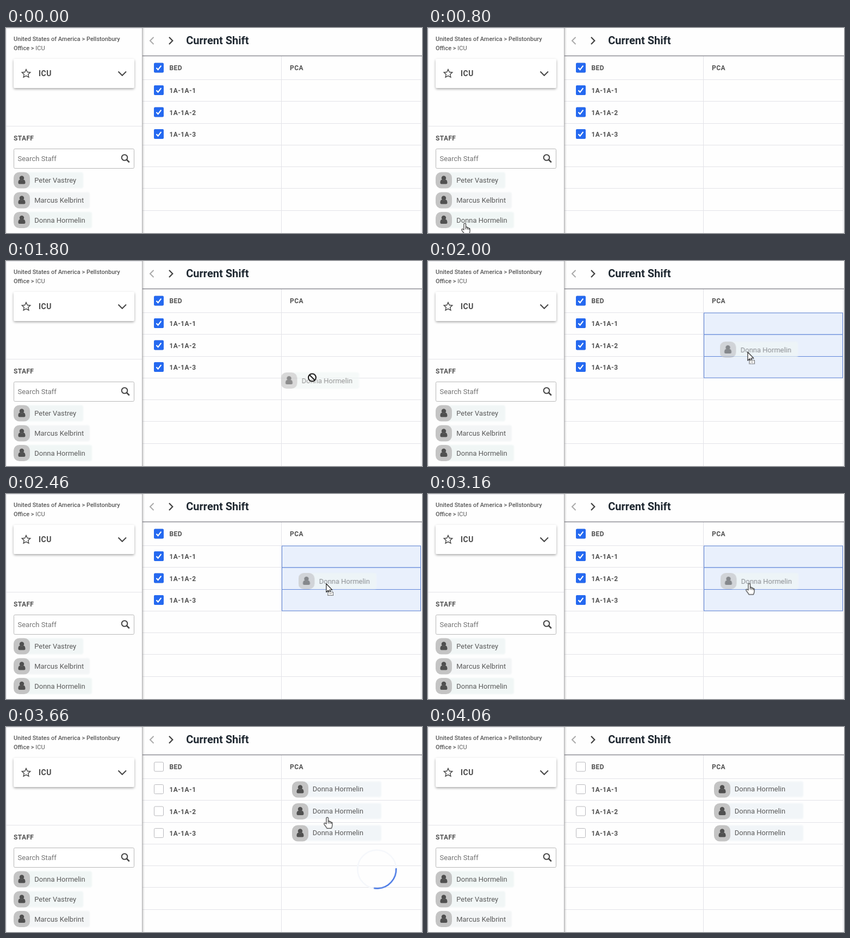
Recreate the animation shown at these times as an HTML page. Size 765 px wide and 379 px high, loop 4.5 s.

```html
<!DOCTYPE html>
<html lang="en">
<head>
<meta charset="utf-8">
<title>Shift assignment</title>
<style>
  html, body { margin: 0; width: 100%; height: 100%; overflow: hidden; background: #fefefe; }
  svg { display: block; width: 765px; height: 379px; font: 13px Roboto, sans-serif; fill: #5a5a5a; }
  .line { fill: none; stroke: #e3e3e8; }
  .head { font-size: 12px; font-weight: 700; letter-spacing: .4px; fill: #525252; }
  .crumb { font-size: 11px; font-weight: 500; }
  .icon { fill: none; stroke: #444; stroke-width: 2; }
  .cursor { fill: #fff; stroke: #111; stroke-width: 1.1; stroke-linejoin: round; }

  /* Every part shares one 4.5 s clock and changes in hard steps. */
  .timed { animation: 4.5s step-end infinite; }
  #hand { animation-name: hand; }
  #denied { animation-name: denied; }
  #arrow { animation-name: arrow; }
  #ghost { animation-name: ghost; }
  #targets { animation-name: targets; }
  #checked { animation-name: checked; }
  #assigned { animation-name: assigned; }
  #assignedIcons { animation-name: assigned-icons; }
  #before { animation-name: before; }
  #after { animation-name: after; }
  #spinner { animation-name: spinner; }
  #arc { animation-name: spin; transform-origin: 682px 263px; }

  @keyframes hand {
    0% { opacity: 0; transform: translate(61px, 359px); }
    6.66% { opacity: 1; transform: translate(61px, 359px); }
    8.88% { opacity: 1; transform: translate(67px, 361px); }
    17.77% { opacity: 1; transform: translate(68px, 361px); }
    22.22% { opacity: 1; transform: translate(67px, 359px); }
    26.66% { opacity: 0; transform: translate(67px, 359px); }
    70.22% { opacity: 1; transform: translate(591px, 165.5px); }
    72.44% { opacity: 1; transform: translate(591px, 167px); }
    85.77% { opacity: 1; transform: translate(670px, 250px); }
    88% { opacity: 1; transform: translate(752px, 334px); }
    90.22% { opacity: 0; transform: translate(752px, 334px); }
  }
  @keyframes denied {
    0% { opacity: 0; transform: none; }
    26.66% { opacity: 1; transform: translate(98px, 361px); }
    28.88% { opacity: 1; transform: translate(125px, 361px); }
    31.11% { opacity: 1; transform: translate(165px, 361px); }
    33.33% { opacity: 1; transform: translate(270px, 330px); }
    35.55% { opacity: 1; transform: translate(415px, 281px); }
    37.77% { opacity: 1; transform: translate(526px, 239px); }
    40% { opacity: 1; transform: translate(563px, 215.5px); }
    44.44% { opacity: 0; transform: none; }
  }
  @keyframes ghost {
    0% { opacity: 0; transform: none; }
    26.66% { opacity: .65; transform: translate(52px, 340px); }
    28.88% { opacity: .65; transform: translate(69px, 341px); }
    31.11% { opacity: .65; transform: translate(92px, 341.5px); }
    33.33% { opacity: .65; transform: translate(200px, 322px); }
    35.55% { opacity: .65; transform: translate(350px, 278px); }
    37.77% { opacity: .65; transform: translate(469px, 232px); }
    40% { opacity: .65; transform: translate(505.5px, 206px); }
    44.44% { opacity: .65; transform: translate(536.5px, 149px); }
    52.44% { opacity: .65; transform: translate(537px, 147px); }
    54.66% { opacity: .65; transform: translate(537.5px, 146px); }
    72.44% { opacity: 0; transform: none; }
  }
  @keyframes arrow {
    0% { opacity: 0; transform: none; }
    44.44% { opacity: 1; transform: translate(588px, 168.5px); }
    52.44% { opacity: 1; transform: translate(588.5px, 167px); }
    54.66% { opacity: 1; transform: translate(589px, 166px); }
    70.22% { opacity: 0; transform: none; }
  }
  @keyframes targets { 0% { opacity: 0 } 44.44% { opacity: 1 } 74.66% { opacity: 0 } }
  @keyframes checked { 0% { opacity: 1 } 74.66% { opacity: 0 } }
  @keyframes assigned { 0% { opacity: 0 } 74.66% { opacity: 1 } }
  @keyframes assigned-icons { 0% { opacity: 0 } 76.88% { opacity: 1 } }
  @keyframes before { 0% { opacity: 1 } 81.33% { opacity: 0 } }
  @keyframes after { 0% { opacity: 0 } 81.33% { opacity: 1 } }
  @keyframes spinner { 0% { opacity: 0 } 72.44% { opacity: 1 } 83.55% { opacity: 0 } }
  @keyframes spin {
    0% { transform: rotate(-36deg); }
    72.44% { transform: rotate(-36deg); animation-timing-function: steps(5); }
    83.55%, 100% { transform: rotate(144deg); }
  }
</style>
</head>
<body>
<svg viewBox="0 0 765 379">
  <defs>
    <filter id="shadow" x="-10%" y="-20%" width="120%" height="150%">
      <feDropShadow dx="0" dy="2" stdDeviation="2" flood-color="#000" flood-opacity=".34"/>
    </filter>
    <filter id="soft"><feGaussianBlur stdDeviation="1"/></filter>
    <linearGradient id="edge">
      <stop stop-color="#777" stop-opacity=".4"/>
      <stop offset="1" stop-color="#777" stop-opacity="0"/>
    </linearGradient>

    <rect id="avatar" width="30" height="30" rx="10.5" fill="#c4c4c4"/>
    <g id="person" fill="#505050">
      <circle cx="15" cy="11" r="4.2"/>
      <path d="M8.5 19.5C8.5 15.5 10 14 12 13.8Q15 16.5 18 13.8C20 14 21.5 15.5 21.5 19.5Q21.5 22 19 22H11Q8.5 22 8.5 19.5Z"/>
    </g>
    <g id="face"><use href="#avatar"/><use href="#person"/></g>

    <g id="peter">
      <rect x="20" width="108" height="30" rx="4" fill="#f1f6f6" filter="url(#soft)"/>
      <use href="#face"/><text x="38.2" y="19.5">Peter Vastrey</text>
    </g>
    <g id="marcus">
      <rect x="20" width="120" height="30" rx="4" fill="#f3f5f6" filter="url(#soft)"/>
      <use href="#face"/><text x="38.2" y="19.5">Marcus Kelbrint</text>
    </g>
    <g id="donna">
      <rect x="20" width="124" height="30" rx="4" fill="#f0f6f5" filter="url(#soft)"/>
      <use href="#face"/><text x="38.2" y="19.5">Donna Hormelin</text>
    </g>
    <g id="cell">
      <rect x="20" width="144" height="29" rx="3" fill="#f1f5f8" filter="url(#soft)"/>
      <use href="#avatar"/><text x="37.7" y="18.7">Donna Hormelin</text>
    </g>

    <rect id="box" x=".5" y=".5" width="17" height="17" rx="2" fill="#fff" stroke="#b8b8bc"/>
    <g id="tick">
      <rect width="18" height="18" rx="2" fill="#2569f0"/>
      <path d="M4.5 9.3L7.6 12.6L13.3 5.2" fill="none" stroke="#fff" stroke-width="2.2"/>
    </g>
  </defs>

  <rect width="765" height="379" fill="#fefefe"/>

  <!-- table -->
  <path class="line" d="M251 95.5H764M251 135.5H764M251 176.5H764M251 216.5H764M251 256.5H764M251 296.5H764M251 337.5H764M506.5 52V379M763.5 52V379"/>
  <path d="M251 51.5H765" stroke="#8b8b92" stroke-width="1.6"/>
  <path class="icon" d="M271.5 17L265 23.5L271.5 30" style="stroke:#a9a9a9"/>
  <path class="icon" d="M300 17L306.3 23.5L300 30" style="stroke-width:2.3"/>
  <text x="331.2" y="30.3" font-size="20" font-weight="700" fill="#1f2831">Current Shift</text>
  <g class="head">
    <text x="300.5" y="78">BED</text>
    <text x="522" y="78">PCA</text>
    <text x="300.5" y="120">1A-1A-1</text>
    <text x="300.5" y="160.5">1A-1A-2</text>
    <text x="300.5" y="201">1A-1A-3</text>
  </g>
  <use href="#box" x="272" y="64.500"/>
  <use href="#box" x="272" y="106"/>
  <use href="#box" x="272" y="146.5"/>
  <use href="#box" x="272" y="187"/>
  <g id="checked" class="timed">
    <use href="#tick" x="272" y="64.5"/>
    <use href="#tick" x="272" y="106"/>
    <use href="#tick" x="272" y="146.5"/>
    <use href="#tick" x="272" y="187"/>
  </g>
  <g id="targets" class="timed" fill="#e9f0fc" stroke="#5c83d8">
    <rect x="507.5" y="96" width="255" height="40"/>
    <rect x="507.5" y="136" width="255" height="40.500"/>
    <rect x="507.5" y="176.5" width="255" height="39.5"/>
  </g>
  <g id="assigned" class="timed">
    <use href="#cell" x="526" y="100.5"/>
    <use href="#cell" x="526" y="141"/>
    <use href="#cell" x="526" y="181.5"/>
    <g id="assignedIcons" class="timed">
      <use href="#person" x="526" y="100.5"/>
      <use href="#person" x="526" y="141"/>
      <use href="#person" x="526" y="181.5"/>
    </g>
  </g>

  <!-- sidebar -->
  <rect x="250" width="5" height="379" fill="url(#edge)"/>
  <path d="M250.5 0V379" stroke="#b0b0b3"/>
  <path class="line" d="M.5 379V.5H250M0 181.5H250"/>
  <text class="crumb" x="14" y="24">United States of America &gt; Pellstonbury</text>
  <text class="crumb" x="14" y="40.5">Office &gt; <tspan font-weight="400">ICU</tspan></text>
  <rect x="14" y="57" width="222" height="54" rx="3" fill="#fff" filter="url(#shadow)"/>
  <path class="icon" d="M37 76.5L39.3 81.5L44.8 82.1L40.7 85.8L41.9 91.2L37 88.4L32.1 91.2L33.3 85.8L29.2 82.1L34.7 81.5Z" style="stroke-width:1.4"/>
  <text x="60" y="89" font-size="14" font-weight="700" letter-spacing=".5" fill="#4a4a4a">ICU</text>
  <path class="icon" d="M206.5 80.5L213.7 87.8L221 80.5"/>
  <text class="head" x="14" y="208">STAFF</text>
  <rect x="14.5" y="223.5" width="221" height="36" rx="2" fill="#fff" stroke="#b7b7b7"/>
  <text x="21.5" y="246" fill="#737373">Search Staff</text>
  <circle class="icon" cx="218" cy="239.5" r="5.3"/>
  <path class="icon" d="M222 243.5L226.8 248.3" style="stroke-width:2.6"/>
  <g id="before" class="timed">
    <use href="#peter" x="14" y="266.5"/>
    <use href="#marcus" x="14" y="303.5"/>
    <use href="#donna" x="14" y="340"/>
  </g>
  <g id="after" class="timed">
    <use href="#donna" x="14" y="266.5"/>
    <use href="#peter" x="14" y="303.5"/>
    <use href="#marcus" x="14" y="340"/>
  </g>

  <!-- drag, progress and pointers -->
  <g id="spinner" class="timed" fill="none" stroke-width="2.5">
    <circle cx="682" cy="263" r="35.5" stroke="#f5f7fb"/>
    <g id="arc" class="timed">
      <circle cx="682" cy="263" r="35.5" stroke="#4274e4" pathLength="360" stroke-dasharray="102 258" transform="rotate(-111 682 263)"/>
    </g>
  </g>
  <g id="ghost" class="timed"><use href="#donna"/></g>
  <g id="denied" class="timed" fill="none">
    <circle r="7" stroke="#fff" stroke-width="4"/>
    <path d="M-5 -5L5 5" stroke="#fff" stroke-width="4"/>
    <circle r="7" stroke="#111" stroke-width="2"/>
    <path d="M-5 -5L5 5" stroke="#111" stroke-width="2"/>
  </g>
  <g id="arrow" class="timed">
    <path class="cursor" d="M0 0V15.5L3.6 12.2L6 17.8L8.4 16.8L6 11.3H11Z"/>
    <rect class="cursor" x="3" y="15" width="9.5" height="6.5" stroke-dasharray="1.5 1"/>
    <path d="M5.5 18.3H10" stroke="#777"/>
  </g>
  <g id="hand" class="timed">
    <path class="cursor" transform="scale(.92 .97)" d="M-2.2 12.5V2A2 2 0 0 1 1.8 2V7.5Q4.6 6.4 5 8.6Q7.3 7.6 7.8 9.8Q9.8 9 9.8 11.5V14.5Q9.8 17.5 8 21H-1Q-2 18.5 -6 14Q-7.6 11.8 -6 11Q-4.6 10.4 -2.2 12.5ZM1.8 7.5V11.5M5 8.6V12M7.8 9.8V12.3"/>
  </g>
</svg>
</body>
</html>
```
